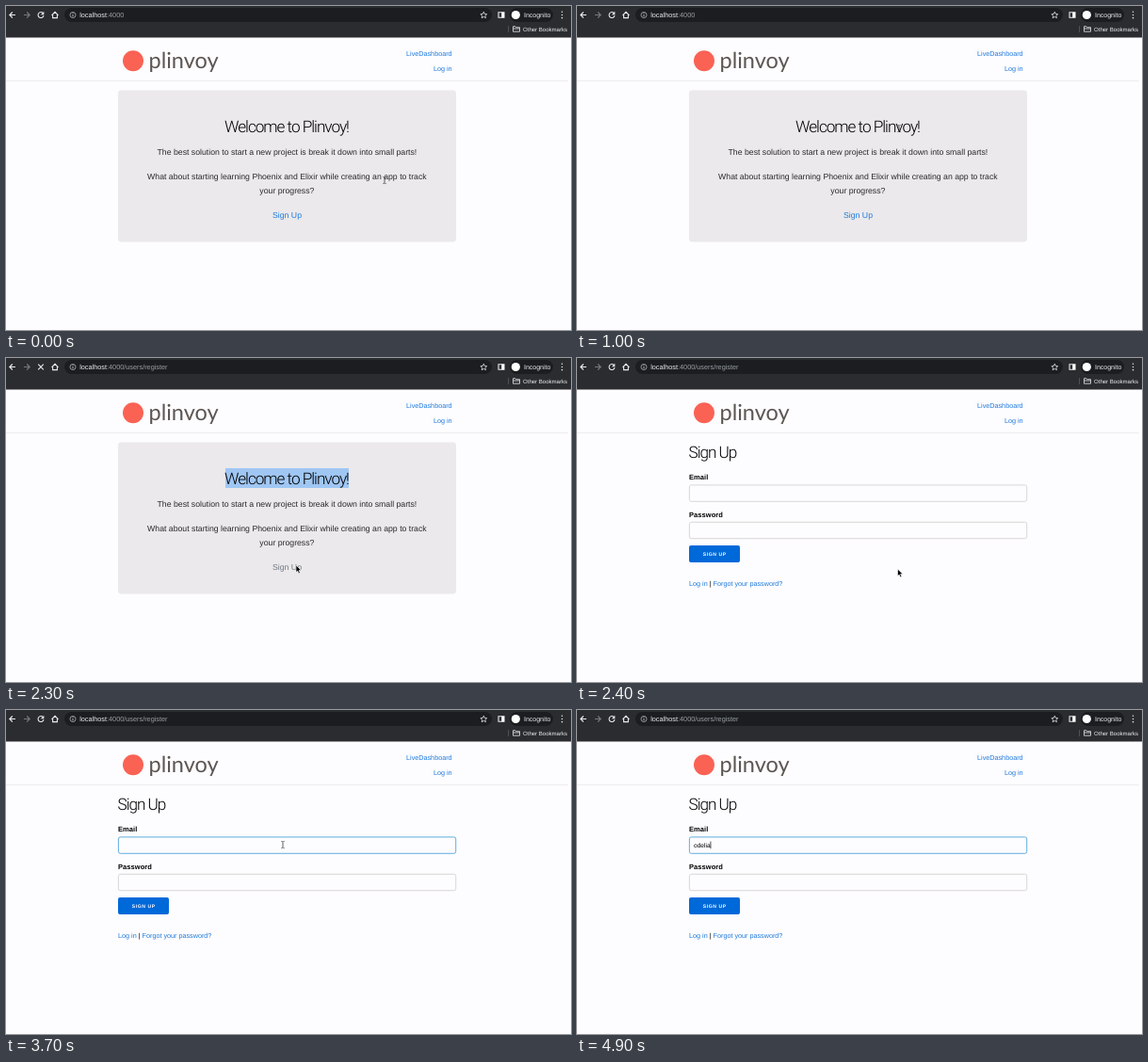
An HTML page for the animation above (5000 ms loop, 600 by 344 pixels).

```html
<!DOCTYPE html>
<html lang="en">
<head>
<meta charset="utf-8">
<title>Sign up demo</title>
<style>
  html, body { margin: 0; height: 100%; overflow: hidden; background: #fdfcfe; }
  svg { display: block; width: 600px; height: 344px; }
  text { text-rendering: geometricPrecision; white-space: pre; }
  .ui { font-family: "Liberation Sans", Arial, sans-serif; fill: #eceef1; }
  .page { font: 7.22px "Liberation Sans", Arial, sans-serif; }
  .page .big { font: 300 17.2px Roboto, "Liberation Sans", sans-serif; letter-spacing: -1.03px; }
  .page .hero { font-size: 8.71px; text-anchor: middle; fill: #29282a; }
  .page .mid { text-anchor: middle; }
  .page .bold { font-weight: 700; font-size: 7.5px; letter-spacing: .07px; }
  .link { fill: #1f7bdd; }
  .box { fill: #fdfcfe; stroke: #cfcdd0; stroke-width: .8; }
  .line { fill: none; stroke: #e8eaed; stroke-width: 1.1; }
  .dim { fill: #9aa0a6; }
</style>
</head>
<body>
<svg viewBox="0 0 600 344">
  <!-- browser bar -->
  <rect width="600" height="33.5" fill="#2b2c2f"/>
  <rect x="62" y="2" width="454" height="15" rx="7.5" fill="#1c1d20"/>
  <path class="line" d="M10 9.5H4M6.8 6.5l-3 3 3 3"/>
  <path class="line" style="stroke:#77797d" d="M19 9.5h6M22.2 6.5l3 3-3 3"/>
  <g id="reload">
    <path class="line" d="M39.3 7.5A3 3 0 1 0 40 10.2"/>
    <path d="M40.3 5.8v3.4h-3.4z" fill="#e8eaed"/>
  </g>
  <path id="stop" class="line" d="M34.2 6.7l5.6 5.6m0-5.6l-5.6 5.6"/>
  <path class="line" d="M48.5 9.8l3.5-3.5 3.5 3.5M49.6 9.2v3.4h4.8V9.2"/>
  <circle class="line" cx="71" cy="9.5" r="3" style="stroke:#b4b7bb;stroke-width:.8"/>
  <path class="line" d="M71 9.2v2M71 7.4v.9" style="stroke-width:.8"/>
  <text class="ui" x="78.2" y="12" font-size="7.3">localhost<tspan class="dim">:4000<tspan id="path"></tspan></tspan></text>
  <path class="line" style="stroke-width:.8" d="M507.3 6.2l1 2.2 2.4.3-1.8 1.6.5 2.4-2.1-1.2-2.1 1.2.5-2.4-1.8-1.6 2.4-.3z"/>
  <path class="line" d="M523 6.8h6v5.4h-6z"/><path d="M526.2 6.8h2.8v5.4h-2.8z" fill="#fff"/>
  <rect x="535" y="2" width="46" height="15" rx="7.5" fill="#1c1d20"/>
  <circle cx="541.3" cy="9.5" r="4.6" fill="#fff"/>
  <text class="ui" x="550" y="12" font-size="7">Incognito</text>
  <path d="M590.5 6.2v.1m0 3.1v.1m0 3.1v.1" stroke="#e8eaed" stroke-width="1.5" stroke-linecap="round"/>
  <path d="M533.5 21v7" stroke="#5a5c60" stroke-width=".8"/>
  <path class="line" style="stroke-width:.8" d="M538.5 21.7h2.5l.8 1h3.7v4.5h-7zM538.5 24h7"/>
  <text class="ui" x="549" y="26.6" font-size="6.05">Other Bookmarks</text>

  <!-- site header -->
  <g class="page">
    <circle cx="135" cy="58.3" r="11" fill="#fa6254"/>
    <text x="151.5" y="66" fill="#5c5552" style="font:400 23.5px Lato,sans-serif">plinvoy</text>
    <text class="link" x="473.6" y="52.6" text-anchor="end">LiveDashboard</text>
    <text class="link" x="473.6" y="69.3" text-anchor="end">Log in</text>
    <path d="M0 79.5h597" stroke="#edebee"/>
  </g>

  <g id="home" class="page">
    <rect x="119" y="89.5" width="359" height="161" rx="3.4" fill="#ebe9eb"/>
    <rect id="mark" x="233" y="117" width="131" height="21" fill="#a0c7f4"/>
    <text class="big mid" x="298" y="134">Welcome to Plinvoy!</text>
    <text class="hero" x="298.4" y="158">The best solution to start a new project is break it down into small parts!</text>
    <text class="hero" x="298.4" y="184.2">What about starting learning Phoenix and Elixir while creating an app to track</text>
    <text class="hero" x="298.4" y="198.6">your progress?</text>
    <text id="join" class="hero" x="298.5" y="225.2">Sign Up</text>
  </g>

  <g id="form" class="page">
    <text class="big" x="118.5" y="106.3">Sign Up</text>
    <text class="bold" x="119" y="129">Email</text>
    <rect id="email" class="box" x="119.4" y="134.9" width="358.3" height="17.4" rx="2"/>
    <text class="bold" x="119" y="168.6">Password</text>
    <rect class="box" x="119.4" y="174.3" width="358.3" height="17.4" rx="2"/>
    <rect x="119" y="199" width="54" height="18" rx="2" fill="#0069d9"/>
    <text class="bold mid" x="146.2" y="210" fill="#fff" style="font-size:5.1px;letter-spacing:.55px">SIGN UP</text>
    <text class="link" x="119" y="242">Log in<tspan fill="#000"> | </tspan>Forgot your password?</text>
    <text id="typed" x="124" y="145.7" style="font-size:6.6px"></text>
    <path id="caret" d="M0 139.6v7.6" stroke="#000" stroke-width=".7"/>
  </g>

  <g id="cursor">
    <path id="beam" d="M-1.6-3.6q1.2 0 1.6.8q.4-.8 1.6-.8M0-2.8v5.6M-1.6 3.6q1.2 0 1.6-.8q.4.8 1.6.8" fill="none" stroke="#222" stroke-width=".7"/>
    <path id="arrow" d="M0 0v7.6l1.7-1.6 1.2 2.7 1.4-.6-1.2-2.6h2.4z" fill="#000" stroke="#fff" stroke-width=".6"/>
    <path id="hand" d="M-.8 0q.8-.8 1.5 0v3l3.4.8q.7.3.5 1.2l-.7 3.6h-4.2l-2.5-3.2q.4-1.1 2 0z" fill="#fff" stroke="#000" stroke-width=".7"/>
  </g>
</svg>
<script>
const $ = id => document.getElementById(id);
const show = (id, on) => $(id).setAttribute("visibility", on ? "inherit" : "hidden");

// pointer path: time, x, y, shape
const stops = [
  [0, 402, 185, "beam"], [500, 346, 135, "beam"], [1000, 342, 130, "beam"],
  [1200, 342, 130, "beam"], [1500, 331, 201, "arrow"], [1800, 309, 221, "hand"],
  [2300, 308, 220, "arrow"], [2400, 340.5, 224, "arrow"], [2500, 340, 223, "arrow"],
  [3000, 303, 157, "arrow"], [3200, 294, 143, "beam"], [5000, 294, 143, "beam"]
];

function pointer(t) {
  const i = stops.findIndex(s => s[0] > t);
  const a = stops[i - 1], b = stops[i];
  const p = (t - a[0]) / (b[0] - a[0]), k = p * p * (3 - 2 * p);
  return { x: a[1] + (b[1] - a[1]) * k, y: a[2] + (b[2] - a[2]) * k, shape: a[3] };
}

function draw(now) {
  const t = Math.floor(now % 5000 / 100) * 100;
  const formOpen = t >= 2400, focus = t >= 3200;
  show("home", !formOpen);
  show("form", formOpen);
  show("mark", t >= 1200);
  const loading = t >= 2200 && !formOpen;
  show("stop", loading);
  show("reload", !loading);
  $("path").textContent = t >= 2200 ? "/users/register" : "";
  $("join").style.fill = t >= 1800 ? "#707a83" : "#1f7bdd";

  $("email").style.stroke = focus ? "#3c9bd8" : "";
  const count = t >= 4900 ? 6 : t >= 4700 ? 2 : t >= 4600 ? 1 : 0;
  const typed = $("typed");
  typed.textContent = "odelia".slice(0, count);
  const end = 124.3 + (count ? typed.getComputedTextLength() : 0);
  $("caret").setAttribute("transform", `translate(${end})`);
  show("caret", focus && (count || (t - 3200) % 1000 < 500));

  const c = pointer(t);
  $("cursor").setAttribute("transform", `translate(${c.x} ${c.y})`);
  show("cursor", !count);
  for (const s of ["beam", "arrow", "hand"]) show(s, s === c.shape);
}

const start = performance.now();
function tick() {
  draw(performance.now() - start);
  requestAnimationFrame(tick);
}
tick();
</script>
</body>
</html>
```
